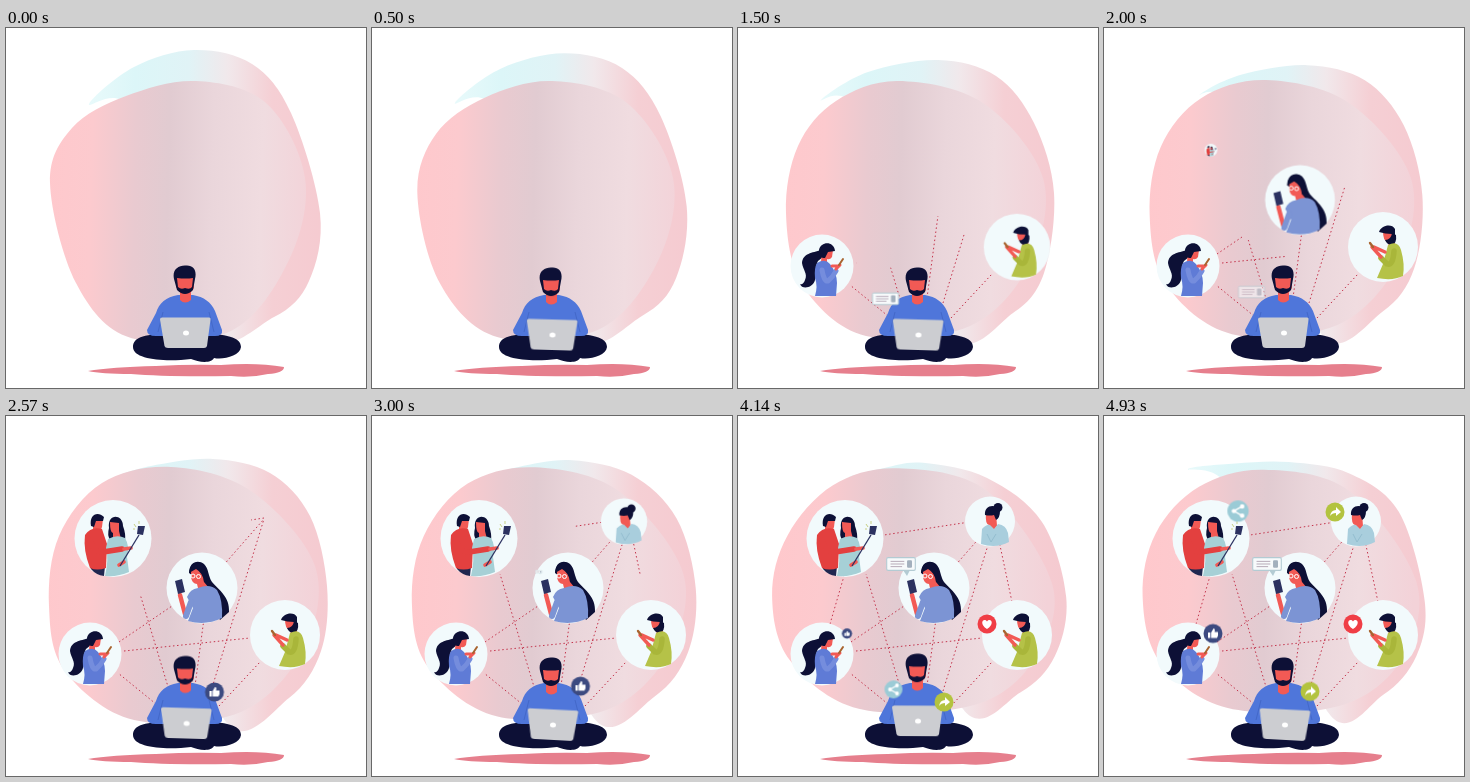
Recreate the animation shown at these times as an HTML page. Size 360 by 360 pixels, loop 5000 ms.

```html
<!DOCTYPE html>
<html lang="en">
<head>
<meta charset="utf-8">
<title>Social network</title>
<style>
html, body { margin: 0; width: 100%; height: 100%; overflow: hidden; background: #fff; }
svg { display: block; width: 100vw; height: 100vh; }
.line { fill: none; stroke: #c4344c; stroke-width: 1; stroke-dasharray: 1.5 2.6; }
.disc { fill: #f2fafc; }
.hair { fill: #0d1036; }
.skin { fill: #f25a55; }
.arm { fill: none; stroke-linecap: round; stroke-linejoin: round; }
.hand { stroke: #f25a55; }
.bob { animation: bob 5s infinite; }
.sway { animation: sway 5s infinite; transform-origin: 180px 305px; }
@keyframes bob {
  0%, 40%, 80% { transform: none; animation-timing-function: ease-in-out; }
  20%, 60%, 100% { transform: translateY(4px); animation-timing-function: ease-in-out; }
}
@keyframes sway {
  0%, 40%, 80% { transform: none; animation-timing-function: ease-in-out; }
  20%, 60%, 100% { transform: translate(1px, 4px) rotate(3deg); animation-timing-function: ease-in-out; }
}
</style>
</head>
<body>
<svg viewBox="0 0 360 360">
  <defs>
    <linearGradient id="backFill" gradientUnits="userSpaceOnUse" x1="80" x2="325" y1="0" y2="0">
      <stop offset="0" stop-color="#e9fafb"/>
      <stop offset=".2" stop-color="#dcf6f8"/>
      <stop offset=".42" stop-color="#e0f3f6"/>
      <stop offset=".58" stop-color="#f1e8eb"/>
      <stop offset=".76" stop-color="#f5cfd4"/>
      <stop offset="1" stop-color="#f5cad0"/>
    </linearGradient>
    <linearGradient id="frontFill" gradientUnits="userSpaceOnUse" x1="40" x2="315" y1="0" y2="8">
      <stop offset="0" stop-color="#ffc8cc"/>
      <stop offset=".18" stop-color="#fccace"/>
      <stop offset=".34" stop-color="#e9cad0"/>
      <stop offset=".46" stop-color="#e1cbd1"/>
      <stop offset=".62" stop-color="#ead6db"/>
      <stop offset=".8" stop-color="#f0dce0"/>
      <stop offset="1" stop-color="#f3d2d8"/>
    </linearGradient>
    <g id="like">
      <circle r="9.5" fill="#3c4a80"/>
      <path d="M-5-1h2.4v5.5H-5zM-1.800-1L.5-5Q2.400-5 1.600-1.600H5Q5.600 2 4 4.500H-1.800z" fill="#fff"/>
    </g>
    <g id="share">
      <circle r="9" fill="#9bcbd6"/>
      <path d="M3.500-4L-3.500 0L3.500 4" fill="none" stroke="#fff" stroke-width="1.2"/>
      <g fill="#fff"><circle cx="3.500" cy="-4" r="1.900"/><circle cx="-3.500" r="1.900"/><circle cx="3.500" cy="4" r="1.900"/></g>
    </g>
    <g id="reply">
      <circle r="9.500" fill="#b3c33f"/>
      <path d="M-5 4Q-4-2 1-2V-5L6 0L1 4V1Q-3 1-5 4z" fill="#fff"/>
    </g>
    <g id="heart">
      <circle r="9.500" fill="#f03e46"/>
      <path d="M0 5C-9-1-3-7 0-2.500C3-7 9-1 0 5z" fill="#fff"/>
    </g>
    <g id="note">
      <rect x="-13" y="-5.800" width="26" height="11.600" rx="1.200" fill="#f7fafb" stroke="#b3cbd3"/>
      <path d="M-9.500-2.400H3M-9.500 0H3M-9.500 2.400H1" stroke="#b7a9b8" stroke-width=".9"/>
      <rect x="5.500" y="-3.400" width="4.500" height="6.800" rx="1" fill="#a3b0bd"/>
    </g>
  </defs>

  <path id="back" fill="url(#backFill)"/>
  <path id="front" fill="url(#frontFill)"/>
  <g id="lines"></g>

  <g id="girl">
    <circle class="disc" cx="84" cy="238" r="31.500"/>
    <path class="hair" d="M83 222C74 225 65 225 64 235C65 242 70 246 67 252C66 255 64 257 62 256C64 262 75 260 77 252C79 244 77 238 80 233L85 229z"/>
    <path class="skin" d="M84 223L95 222L94 229Q92 232 89 231L89 236L83 234z"/>
    <path class="hair" d="M81 222C83 213 96 213 97 223L90 224L87 230Q80 231 81 222z"/>
    <path d="M79 235Q87 230 92 236Q99 245 99 255L98 268H77Q80 258 77 250Q76 240 79 235z" fill="#5f7bd6"/>
    <path class="arm" d="M84 242Q86 254 90 253Q95 249 98 243" stroke="#758ddd" stroke-width="5"/>
    <path class="arm hand" d="M94 238L101 238M98 241L102 237" stroke-width="3"/>
    <path class="arm" d="M101 237L105 231" stroke="#a8642f" stroke-width="2"/>
  </g>

  <g id="guy">
    <circle class="disc" cx="279" cy="219" r="35"/>
    <path class="skin" d="M279 203H289L291 216L285 219L284 213Q279 214 279 203z"/>
    <path class="hair" d="M275 204C277 197 288 195 291 201L291 208L288 206Q281 206 275 204z"/>
    <path class="hair" d="M281 212Q287 212 288 205L292 207Q293 215 288 217Q283 217 281 212z"/>
    <path d="M284 217Q294 212 297 222Q301 236 299 248Q289 253 273 250L279 236z" fill="#b5c248"/>
    <path class="arm" d="M290 223Q289 238 283 236L277 230" stroke="#a9b63a" stroke-width="5.500"/>
    <path class="arm hand" d="M277 229L268 219M281 224L270 219" stroke-width="3.400"/>
    <path class="arm" d="M266 215L269 219" stroke="#a8642f" stroke-width="2.400"/>
  </g>

  <g id="woman">
    <circle class="disc" cx="196" cy="172" r="35.500"/>
    <path class="hair" d="M183 157C183 146 192 143 198 148C203 153 202 160 206 166C213 174 224 181 223 196L214 204L198 172L190 162z"/>
    <path class="skin" d="M185 154Q191 151 197 155L198 166L203 172L193 176L191 168Q186 168 185 161z"/>
    <path class="hair" d="M183 157Q184 146 193 146Q200 149 201 165L198 166Q197 157 190 153z"/>
    <path d="M181 181Q184 173 192 172Q204 167 211 174Q217 184 216 202Q200 210 182 205L187 192z" fill="#7c94d4"/>
    <path class="arm hand" d="M174 179L179 198" stroke-width="4.500"/>
    <path class="arm" d="M180 200L185 186" stroke="#7c94d4" stroke-width="6"/>
    <path d="M169 165L176 163L179 176L172 178z" fill="#2b3160"/>
    <g fill="none" stroke="#fff"><circle cx="187" cy="160" r="2"/><circle cx="192.500" cy="160.500" r="2"/></g>
  </g>

  <g id="couple">
    <circle class="disc" cx="107" cy="122.500" r="38.500"/>
    <path d="M84 150H99L98 160Q90 159 85 153z" fill="#20264f"/>
    <path class="skin" d="M87 102L97 103L96 111L94 116L87 114z"/>
    <path class="hair" d="M85 110C83 98 92 95 98 101L97 105L90 105L88 111z"/>
    <path d="M79 119Q85 110 96 113L101 128L100 152Q91 155 84 152Q77 134 79 119z" fill="#e3403f"/>
    <path class="hair" d="M103 112C101 97 117 98 117 110Q120 118 119 125L104 124Q101 119 103 112z"/>
    <path class="skin" d="M104 106L113 107L113 115L115 123H107L107 117Q104 117 104 106z"/>
    <path d="M102 123Q111 118 119 122Q124 130 121 141L123 156Q112 161 99 160Q103 143 100 132z" fill="#a6d0d6"/>
    <path class="arm" d="M84 124Q88 137 97 136L116 133" stroke="#e3403f" stroke-width="5.500"/>
    <path class="arm hand" d="M118 133L125 132M113 149L118 146" stroke-width="3.600"/>
    <path d="M114 150L133 119" stroke="#2b3160" stroke-width="1.300"/>
    <path d="M132 110L139 110L137 119L131 118z" fill="#2b3160"/>
    <path d="M128 108L130 111M133 105V108M127 113H129" stroke="#c7cf84"/>
  </g>

  <g id="friend">
    <circle class="disc" cx="252" cy="105.500" r="25"/>
    <circle class="hair" cx="260" cy="91.500" r="4.500"/>
    <path class="skin" d="M248 97H258L259 110L255 115L251 109Q247 108 248 97z"/>
    <path class="hair" d="M247 99C246 89 258 87 262 95Q262 102 258 104L256 99Q252 100 247 99z"/>
    <path d="M244 113Q249 108 252 109L256 113L260 108Q268 109 270 117L271 126Q258 133 243 128z" fill="#a9cedd"/>
    <path d="M249 118L253 126L258 118" fill="none" stroke="#93bdcf"/>
  </g>

  <g id="noteFixed">
    <path d="M165 154L169 160L172 154z" fill="#b3cbd3"/>
    <use href="#note" transform="translate(163 148) scale(1.1)"/>
  </g>
  <use id="shareFixed" href="#share" transform="translate(134 95) scale(1.18)"/>
  <use id="replyTop" href="#reply" x="231" y="96"/>
  <use id="likeTop" href="#like" x="109" y="217.500"/>
  <use id="heartTop" href="#heart" x="249" y="208"/>

  <path d="M82 343Q105 339 150 338Q185 336 215 337Q250 334 278 339Q278 345 262 346Q245 350 225 348Q160 349 125 346Q95 346 82 343z" fill="#e67f8d"/>
  <path class="hair" d="M127 319C127 307 145 305 180 306C216 305 235 308 235 319C234 328 217 332 208 330C205 336 192 334 185 331C160 334 127 332 127 319z"/>
  <path d="M172 267C160 269 153 275 150 285L141 302Q141 308 150 308H209Q217 308 216 302L209 283C205 274 198 269 187 267z" fill="#4f76da"/>
  <path d="M157 284L152 304M203 284L208 304" stroke="#4065c4" stroke-width=".8"/>
  <g class="bob">
    <path class="skin" d="M170 247H188V260L185 264V272Q179 277 174 272V264L170 259z"/>
    <path class="hair" d="M168 251C166 242 172 237 180 237.500C188 237 191 243 189 251L187 262Q179 270 171 262zM171 250L172 259Q175 262 179 260Q184 262 186 259L187 250Q180 251 171 250z" fill-rule="evenodd"/>
  </g>
  <g class="sway">
    <path d="M154 291.500Q154 289.500 156 289.500H203Q205 289.500 204.500 291.500L201 318Q200.500 320 198 320H162Q159 320 158.500 318z" fill="#cccdd1"/>
    <ellipse cx="180" cy="305" rx="3" ry="2.500" fill="#fff"/>
  </g>
  <use id="noteRise" href="#note"/>
  <use id="likeRise" href="#like"/>
  <use id="shareRise" href="#share"/>
  <use id="replyRise" href="#reply"/>
</svg>
<script>
const LOOP = 5000;
const sheet = document.head.appendChild(document.createElement('style'));
const byId = id => document.getElementById(id);

// keys: [ms, declarations]
function play(el, name, keys) {
  const body = keys.map(([ms, css]) => `${ms / LOOP * 100}% { ${css} }`).join('\n');
  sheet.append(`@keyframes ${name} {\n${body}\n}\n`);
  el.style.animation = `${name} ${LOOP}ms linear infinite`;
}

// Closed smooth curve through x,y pairs
function blob(text) {
  const v = text.split(/[ ,]+/).map(Number), n = v.length / 2;
  const at = i => { const k = (i + n) % n * 2; return [v[k], v[k + 1]]; };
  let d = `M${at(0)}`;
  for (let i = 0; i < n; i++) {
    const [a, b, c, e] = [at(i - 1), at(i), at(i + 1), at(i + 2)];
    const p = b.map((q, k) => q + (c[k] - a[k]) / 6);
    const r = c.map((q, k) => q - (e[k] - b[k]) / 6);
    d += `C${p} ${r} ${c}`;
  }
  return d + 'Z';
}

function morph(id, shapes) {
  const times = [0, 1500, 2570, 3950, LOOP];
  play(byId(id), id + 'Morph', shapes.map((s, i) => [times[i], `d: path("${blob(s)}")`]));
}

morph('back', [
  '83,76 128,39 188,22 246,36 285,85 314,185 303,253 268,289 200,305 165,120 115,72',
  '83,72 130,44 200,32 258,48 296,95 316,165 306,245 275,285 215,306 165,120 108,70',
  '110,61 145,50 207,43 264,57 304,100 321,170 315,235 283,282 220,306 165,120 125,64',
  '115,64 150,53 185,47 250,63 306,108 330,180 318,240 283,276 225,292 165,120 130,64',
  '82,52 130,47 185,46 245,57 294,95 320,185 312,240 279,279 225,298 165,120 115,61'
]);
morph('front', [
  '44,155 66,100 120,68 190,53 260,75 299,150 283,232 225,303 125,310 70,255',
  '48,185 60,118 98,73 160,53 245,75 305,150 292,235 232,298 128,308 65,258',
  '43,190 53,120 96,67 165,51 245,75 309,150 298,232 235,296 128,304 59,255',
  '33,180 49,120 95,69 160,52 250,75 315,170 295,245 235,289 120,293 51,244',
  '39,180 52,117 95,71 160,54 245,75 312,165 298,243 235,290 124,292 57,247'
]);

// Dotted links: from, to, start, end
[
  ['150 288', '112 257', 1050, 1400],
  ['166 284', '128 158', 700, 2980],
  ['189 270', '201 180', 710, 1580],
  ['205 275', '258 103', 800, 2570],
  ['213 290', '254 246', 700, 1180],
  ['113 226', '166 190', 1700, 2300],
  ['118 235', '244 222', 1500, 2500],
  ['215 152', '258 103', 2000, 2550],
  ['258 102', '146 119', 2440, 3570],
  ['260 120', '274 186', 2600, 3300],
  ['92 208', '106 160', 3100, 3660]
].forEach(([from, to, start, end], i) => {
  const path = document.createElementNS('http://www.w3.org/2000/svg', 'path');
  path.setAttribute('class', 'line');
  byId('lines').append(path);
  const none = `d: path("M${from}L${from}"); visibility: hidden`;
  const full = `d: path("M${from}L${to}"); visibility: visible`;
  play(path, 'link' + i, [[0, none], [start, none], [end, full], [LOOP, full]]);
});

// Grow in place around a centre; base holds a fixed transform
function pop(id, x, y, start, dur, base = '') {
  const el = byId(id);
  el.style.transformOrigin = base ? '0 0' : `${x}px ${y}px`;
  const small = `transform: ${base} scale(0)`, big = `transform: ${base} scale(1)`;
  play(el, id + 'Pop', [
    [0, small],
    [start, small + '; animation-timing-function: ease-out'],
    [start + dur, big],
    [LOOP, big]
  ]);
}

pop('girl', 84, 238, 550, 450);
pop('guy', 279, 219, 1050, 550);
pop('woman', 196, 172, 1550, 500);
pop('couple', 107, 122, 1950, 500);
pop('friend', 252, 105, 2650, 450);
pop('noteFixed', 168, 158, 2950, 350);
pop('heartTop', 249, 208, 3700, 350);
pop('likeTop', 109, 217.5, 4030, 300);
pop('shareFixed', 134, 95, 4300, 350, 'translate(134px, 95px) scale(1.18)');
pop('replyTop', 231, 96, 4500, 350);

// Float up from the laptop, then fade
function rise(id, x, y, start) {
  const end = Math.min(start + 1500, LOOP);
  const key = (ms, size, alpha) =>
    [ms, `transform: translate(${x}px, ${y - (ms - start) * .0135}px) scale(${size}); opacity: ${alpha}`];
  const hidden = key(start, 0, 1)[1], last = key(end, 1, end < LOOP ? 0 : 1);
  play(byId(id), id + 'Up', [
    [0, hidden], [start, hidden], key(start + 220, 1, 1), key(start + 1000, 1, 1), last, [LOOP, last[1]]
  ]);
}

rise('noteRise', 147.5, 280.5, 780);
rise('likeRise', 208.5, 281, 2200);
rise('shareRise', 155.5, 286.8, 3150);
rise('replyRise', 206, 289.3, 3900);
</script>
</body>
</html>
```
